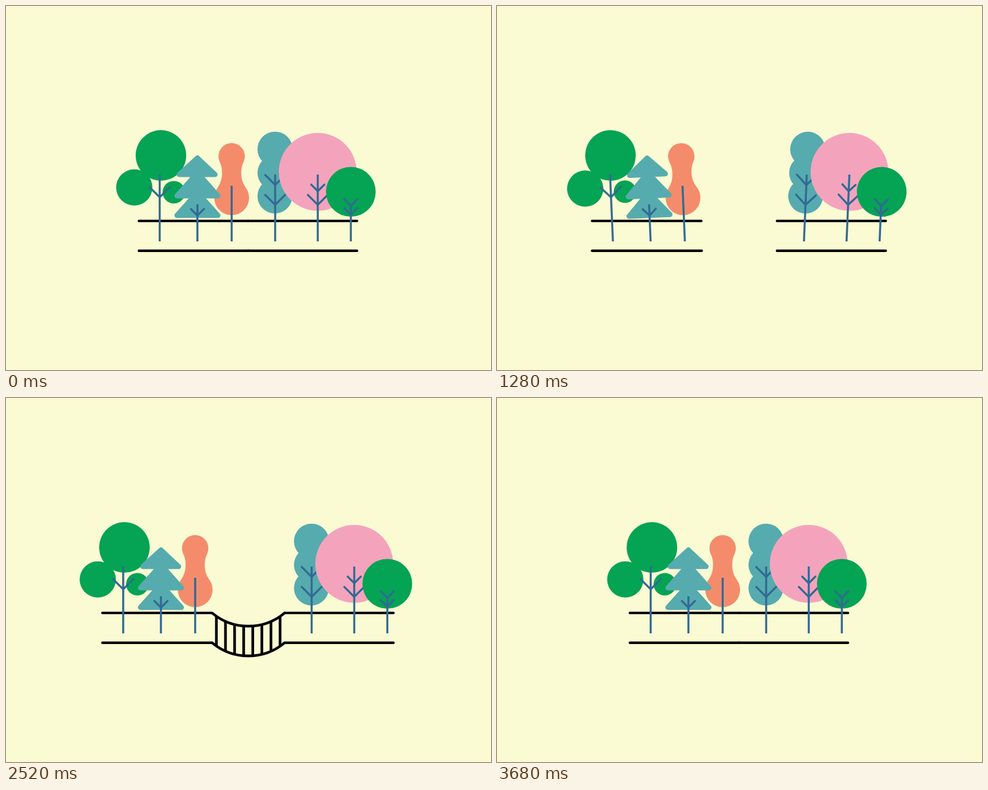
Animation, 864 px wide and 648 px high, one loop 4000 ms. Source, as an HTML page:

```html
<!DOCTYPE html>
<html lang="en">
<head>
<meta charset="utf-8">
<title>Park bridge</title>
<style>
  html, body { margin: 0; height: 100%; overflow: hidden; background: #fafad3; }
  svg { display: block; width: 100vw; height: 100vh; }
  .road, .trim { fill: none; stroke: #000; stroke-width: 4.4; stroke-linecap: round; stroke-linejoin: round; }
  #bridge .trim { stroke-width: 4.8; }
  #bridge .slat { stroke-linecap: butt; }
  .trunk, .twig { fill: none; stroke: #326a94; stroke-width: 3.6; }
  .twig { stroke-linecap: round; }
  .green { fill: #05a354; }
  .teal { fill: #56abae; }
  .pine { stroke: #56abae; stroke-width: 9; stroke-linejoin: round; }
  .orange { fill: #f48c6c; }
  .pink { fill: #f4a3bd; }
</style>
</head>
<body>
<svg viewBox="0 0 864 648">
  <path id="crack" class="trim" pathLength="1" d="M425 383L448 395 413 417 450 434"/>
  <g id="bridge">
    <path id="rail" class="trim" pathLength="1" d="M367.5 383A100.5 100.5 0 0 0 496 383"/>
    <path id="deck" class="trim" pathLength="1" d="M367.5 436A100.5 100.5 0 0 0 496 436"/>
  </g>
  <g id="left"><path class="road" d="M236.7 382.6H431.3M236.7 435.7H432"/></g>
  <g id="right"><path class="road" d="M431.5 382.6H625.3M431.5 435.7H625.3"/></g>
</svg>
<script>
const LOOP = 4000, GROUND = 419;
const $ = id => document.getElementById(id);
const add = (parent, tag, attrs) => {
  const el = document.createElementNS('http://www.w3.org/2000/svg', tag);
  for (const key in attrs) el.setAttribute(key, attrs[key]);
  return parent.appendChild(el);
};

const circle = (cx, cy, r) => ['circle', { cx, cy, r }];
const path = d => ['path', { d }];
const trees = [];

// Each twig is a V given by the height of its joint and its reach.
function tree(side, x, top, color, crown, twigs) {
  const g = add($(side), 'g', {});
  for (const [tag, attrs] of crown) add(g, tag, { class: color, ...attrs });
  add(g, 'path', { class: 'trunk', d: `M${x} ${top}V${GROUND}` });
  for (const [y, w] of twigs)
    add(g, 'path', { class: 'twig', d: `M${x - w} ${y - w}L${x} ${y}L${x + w} ${y - w}` });
  trees.push({ g, x, dir: side === 'left' ? -1 : 1 });
}

tree('left', 273.8, 300, 'green',
  [circle(276, 266, 45), circle(228.5, 323, 32.3), circle(299, 331.5, 20)], [[340.5, 18]]);
tree('left', 402, 320, 'orange',
  [circle(402, 267.5, 23.5), circle(402, 341.3, 31),
   path('M381 278C387 290 386.5 310 378 321.5H426C417.5 310 417 290 423 278Z')], []);
tree('left', 341, 353, 'teal pine',
  [path('M341 270.5L308.5 300H372.5Z'), path('M341 297L304.5 338H377.5Z'),
   path('M341 332L304.5 372.7H377.5Z')], [[373, 11.7]]);
tree('right', 479.5, 300, 'teal',
  [circle(479.3, 255, 31.3), circle(479, 297, 31), circle(479, 338.4, 31)],
  [[318.5, 17.7], [354, 17.7]]);
tree('right', 555.4, 300, 'pink', [circle(555.3, 295.2, 69.3)], [[329.6, 11.7], [354, 17.7]]);
tree('right', 614.3, 355, 'green', [circle(614.3, 330.7, 44.3)], [[355.7, 11.7], [371.5, 11.7]]);

const slats = Array.from({ length: 8 }, (_, i) => {
  const x = 374.8 + i * 16.2;
  const y = 305.6 + Math.sqrt(100.5 ** 2 - (x - 431.75) ** 2);
  return add($('bridge'), 'path', { class: 'trim slat', pathLength: 1, d: `M${x} ${y}v53` });
});

const linear = p => p;
const smooth = p => p * p * (3 - 2 * p);
const quadOut = p => 1 - (1 - p) ** 2;
const inOut = n => p => p < .5 ? (2 * p) ** n / 2 : 1 - (2 - 2 * p) ** n / 2;
const expo = p => p <= 0 ? 0 : p >= 1 ? 1
  : p < .5 ? 2 ** (20 * p - 11) : 1 - 2 ** (9 - 20 * p);
const tween = (t, from, to, ease = smooth) =>
  ease(Math.min(1, Math.max(0, (t - from) / (to - from))));

function trim(el, p) {
  el.style.visibility = p > 0 ? 'visible' : 'hidden';
  el.setAttribute('stroke-dasharray', `${p} 2`);
}

function render(t) {
  trim($('crack'), tween(t, 160, 640, inOut(2)));
  $('crack').style.opacity = 1 - tween(t, 920, 1160, linear);

  const gap = 67.5 * tween(t, 1040, 1320, inOut(4)) - 2.5 * tween(t, 1320, 1480)
    + 3.9 * tween(t, 3280, 3340, quadOut) - 68.9 * tween(t, 3360, 3680, inOut(4));
  const tilt = 2.45 * (tween(t, 960, 1120) - tween(t, 1280, 1480)
    + tween(t, 3280, 3390) - tween(t, 3580, 3680));
  $('left').setAttribute('transform', `translate(${-gap})`);
  $('right').setAttribute('transform', `translate(${gap})`);
  for (const { g, x, dir } of trees)
    g.setAttribute('transform', `rotate(${dir * tilt} ${x} ${GROUND})`);

  trim($('rail'), tween(t, 1520, 2000, expo));
  trim($('deck'), tween(t, 1560, 2040, expo));
  slats.forEach((slat, i) => trim(slat, tween(t, 1720 + i * 80, 1960 + i * 80)));
  $('bridge').style.opacity = 1 - tween(t, 3320, 3480, linear);
}

const start = performance.now();
function frame() {
  render((performance.now() - start) % LOOP);
  requestAnimationFrame(frame);
}
frame();
</script>
</body>
</html>
```
